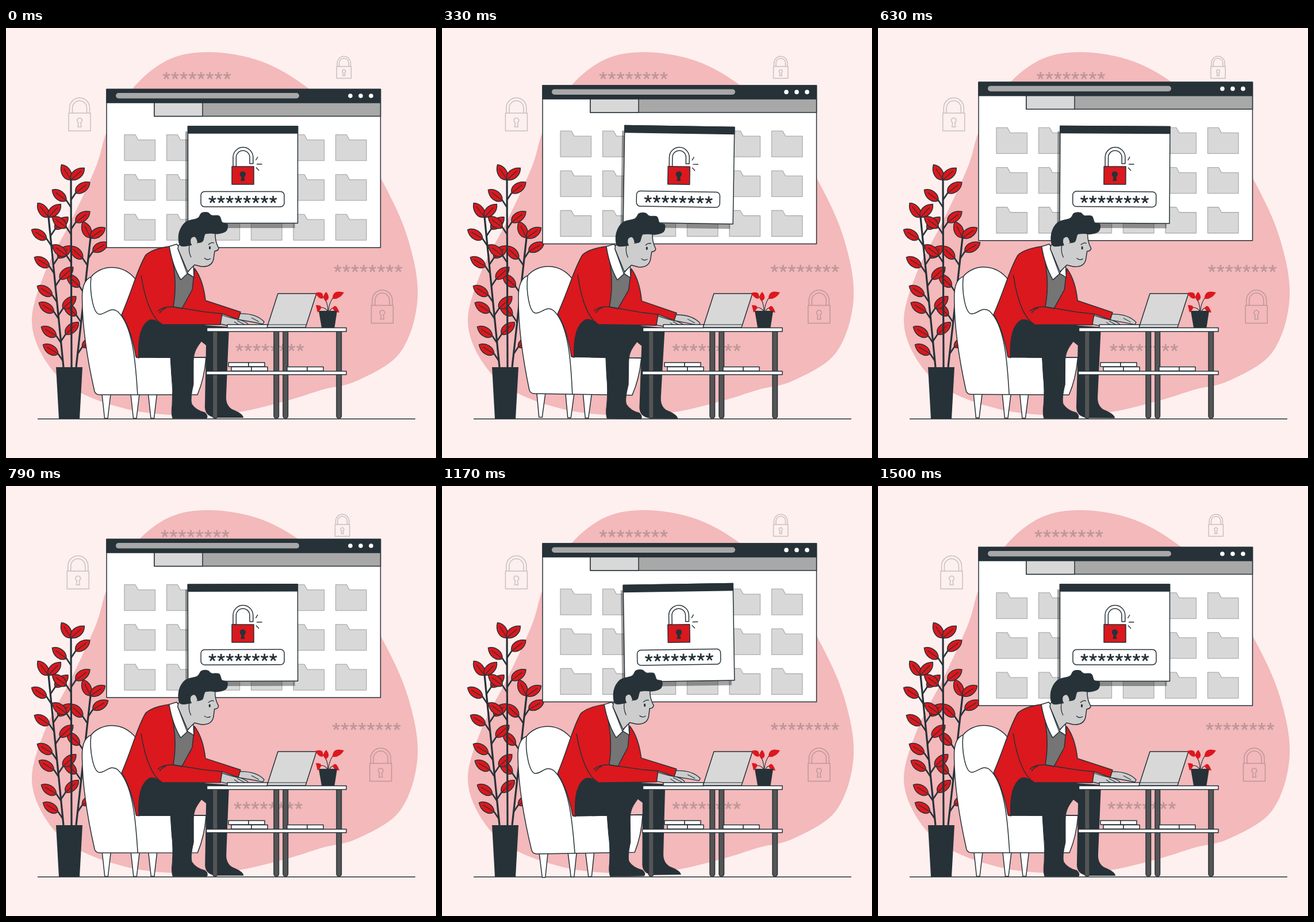
These frames come from a looping animation (748x748 px, 1540 ms). An HTML page with a canvas:

```html
<!DOCTYPE html>
<html lang="en">
<head>
<meta charset="utf-8">
<title>Password</title>
<style>
html, body { margin: 0; width: 100%; height: 100%; overflow: hidden; background: #fef0ef; }
canvas { display: block; width: 100vw; height: 100vh; }
</style>
</head>
<body>
<canvas width="748" height="748"></canvas>
<script>
const ctx = document.querySelector('canvas').getContext('2d');
const DARK = '#263238', RED = '#db181d', WHITE = '#fff', LIGHT = '#d8d8d8',
  MID = '#a8a8a8', SKIN = '#cdcdcd', FAINT = 'rgba(38,50,56,.25)';
const LOOP = 1540, FRAMES = 37, RAD = Math.PI / 180;

function draw(d, fill, stroke, width = 1.5) {
  const path = new Path2D(d);
  if (fill) { ctx.fillStyle = fill; ctx.fill(path); }
  if (stroke) { ctx.strokeStyle = stroke; ctx.lineWidth = width; ctx.stroke(path); }
}

// Smooth closed outline through "x,y x,y ..." key points.
function outline(text) {
  const pts = text.split(' ').map(p => p.split(',').map(Number));
  const pt = i => pts[(i + pts.length) % pts.length];
  const handle = (p, from, to, k) => p.map((v, a) => v + (to[a] - from[a]) * k / 6);
  return `M${pts[0]}` + pts.map((p, i) =>
    `C${handle(p, pt(i - 1), pt(i + 1), 1)} ${handle(pt(i + 1), p, pt(i + 2), -1)} ${pt(i + 1)}`).join('') + 'Z';
}

const box = (x, y, w, h, fill, stroke) => draw(`M${x} ${y}h${w}v${h}h${-w}Z`, fill, stroke);

function pill(x, y, w, h, r, fill, stroke) {
  const path = new Path2D();
  path.roundRect(x, y, w, h, r);
  draw(path, fill, stroke);
}

function at(x, y, angle, scale, paint) {
  ctx.save();
  ctx.translate(x, y);
  ctx.rotate(angle);
  ctx.scale(scale, scale);
  paint();
  ctx.restore();
}

const spin = (x, y, angle, paint) =>
  at(x, y, angle, 1, () => { ctx.translate(-x, -y); paint(); });

// Alternating jolts at every tenth, growing to 4 and dying away.
function shake(u) {
  const jolt = k => (-1) ** k * Math.floor(Math.min(4, 2 ** (Math.min(k, 10 - k) - 1)));
  const k = Math.min(9, Math.floor(u * 10)), p = u * 10 - k;
  return jolt(k) + (jolt(k + 1) - jolt(k)) * p * p * (3 - 2 * p);
}

const sway = u => Math.asin(Math.sin(2 * Math.PI * u)) * 2 / Math.PI;
const lift = u => 14.8 * (Math.abs(2 * u - 1) - 1);

function asterisks(x, y, color) {
  let d = '';
  for (let i = 0; i < 8; i++) {
    for (let k = 0; k < 5; k++) {
      const a = (k * 72 - 90) * RAD;
      d += `M${x + 7 + i * 15.1} ${y}l${6.6 * Math.cos(a)} ${6.6 * Math.sin(a)}`;
    }
  }
  draw(d, null, color, 2.7);
}

function faintLock(x, y, scale) {
  at(x, y, 0, scale, () => draw(
    'M0 27H38V58H0ZM1.5 27V18a17.5 17.5 0 0 1 35 0V27M6.5 27V18a12.5 12.5 0 0 1 25 0V27' +
    'M17 43.5a4.3 4.3 0 1 1 4 0L22 51H16Z', null, FAINT, 1.5 / scale));
}

const BLOB = outline('357,42 285,54 224,101 178,174 157,240 114,334 69,422 45,510 71,582 125,632 ' +
  '220,665 320,674 405,668 490,648 551,629 612,613 686,564 716,470 699,366 655,267 595,169 522,102 444,58');

function faintMarks() {
  asterisks(272, 83, FAINT);
  asterisks(570, 418.5, FAINT);
  asterisks(399, 556, FAINT);
  faintLock(109, 121, 1);
  faintLock(635.5, 455.5, 1);
  faintLock(575.2, 49, .665);
}

function leaf(x, y, angle) {
  at(x, y, angle * RAD, 1, () => {
    draw('M0 0C5 -11 21 -11 31 0C23 10 7 10 0 0Z', RED, DARK);
    draw('M0 0H23', null, DARK, 1.2);
  });
}

// A stem with a pair of leaves on top and side leaves at the given heights.
function stem(rootX, topX, topY, left, right) {
  const lean = Math.atan2(topX - rootX, 590 - topY) / RAD;
  const stemX = y => topX + (rootX - topX) * (y - topY) / (590 - topY);
  draw(`M${rootX} 590L${topX} ${topY}`, null, DARK, 3.2);
  for (const [heights, side] of [[left, -1], [right, 1]]) {
    for (const y of heights) {
      const x = stemX(y + 22);
      draw(`M${x} ${y + 22}L${x + side * 8} ${y + 10}`, null, DARK, 2.6);
      leaf(x + side * 8, y + 10, lean - 90 + side * 53);
    }
  }
  leaf(topX, topY, lean - 122);
  leaf(topX, topY, lean - 41);
}

function tallPlant() {
  stem(122, 147, 365, [391, 440, 490], [379, 438, 545]);
  stem(100, 74, 329, [357, 405, 455, 484, 526, 557], [340, 390, 427, 478, 523]);
  stem(114, 113, 264, [290, 337, 386], [277, 328]);
  draw('M87 590H133L128 680H92Z', DARK);
}

function browser() {
  box(175, 106.5, 476.5, 275.5, WHITE, DARK);
  box(175, 106.5, 476.5, 23.5, DARK, DARK);
  pill(191, 113, 319, 9.5, 4.7, MID);
  for (let x = 599; x < 640; x += 18) pill(x - 3.8, 114.2, 7.6, 7.6, 3.8, WHITE);
  box(258, 130, 393.5, 23.5, MID, DARK);
  box(258, 130, 84, 23.5, LIGHT, DARK);
  for (let i = 0; i < 18; i++) {
    const x = 206 + i % 6 * 73.5, y = 185.7 + Math.floor(i / 6) * 69.2;
    draw(`M${x} ${y}h19l5 9h29.5v36h-53.5Z`, LIGHT, '#afafaf', 1.3);
  }
}

function popup() {
  box(312, 180, 190.5, 168, 'rgba(0,0,0,.36)');
  box(316.5, 171, 191, 168.5, WHITE, DARK);
  box(316.5, 171, 191, 12, DARK, DARK);
  draw('M395 241V225a17.3 17.3 0 0 1 34.8 0V236H424V225a11.8 11.8 0 0 0 -23.6 0V241Z', WHITE, DARK);
  box(393, 241, 38, 31, RED, DARK);
  draw('M409.6 259a5.2 5.2 0 1 1 4.6 0L415.4 266H408.4Z', DARK);
  draw('M434.5 230L438 224M436 236.8H445.5M435 242.5L440 248', null, DARK, 1.4);
  pill(339, 284.5, 145, 26.5, 6.5, WHITE, DARK);
  asterisks(352, 298.5, DARK);
}

function armchair() {
  for (const x of [167, 217, 247.5])
    draw(`M${x} 637l4.5 42h5.5l5 -42Z`, WHITE, DARK);
  draw('M148 433C165 412 203 408 227 439L260 573H348Q345 610 333 638H163Q156 638 154 632Q133 540 132.5 470Q132 439 148 433Z', WHITE, DARK);
  draw('M148 433C145 460 152 498 163 498S181 484 194 493C224 520 226 600 229 638M226 573H348', null, DARK);
}

function legs() {
  draw('M300 514L388 520Q385 590 383 640Q382 656 393 663Q413 671 413 678H366Q344 676 346 655L348 552Z', DARK);
  draw('M228 573Q228 507 260 507L345 513C356 545 326 545 326 580V620Q320 645 323 654Q330 665 346 669Q352 675 349 679H290Q287 671 289 656Q291 630 288 605L286 573Z', DARK, DARK, 1);
}

function hands() {
  draw('M405 497Q435 496 449 511L447 515L426 511L403 507Z', SKIN, DARK, 1.3);
  draw('M374 499Q395 506 408 508Q424 514 421 518L416 520H397L373 515Z', SKIN, DARK, 1.3);
  draw('M397 511L409 519M402 509L419 518M427 504L440 511', null, DARK, 1.1);
}

function torso() {
  draw('M286 382L328 421L326 458L309 490L288 487Z', '#757575', DARK);
  draw('M328 418Q343 438 347 474L408 494L404 507L376 497L373 516H272Q260 506 250 508Q228 520 231 574L226 572Q218 525 201 499C222 450 228 420 243 395Q255 384 284 380Q300 435 291 485L306 488L324 455Z', RED, DARK);
  draw('M235 430Q246 500 272 516M264 493Q272 484 291 485L347 494L376 497M267 496Q273 488 279 487', null, DARK);
  draw('M284 380L297 376L326 413L327 434L316 427L304 438Q290 415 284 380Z', WHITE, DARK);
  draw('M299 384L315 427L326 411', null, DARK, 1.3);
}

const HAIR = outline('303,378 301,357 312,338 333,331 340,322 351,321 358,326 371,327 376,338 ' +
  '385,341 383,353 368,358 348,357 342,371 332,374 320,378');

function head() {
  draw('M300 378L320 360L364 356Q363 370 370 383Q369 388 363 388L361 402Q358 416 340 415L328 412L316 424L299 384Z', SKIN, DARK);
  draw(HAIR, DARK, DARK, 1);
  draw('M333 373Q330 358 322 366Q319 374 326 381Z', SKIN);
  draw('M319 378Q317 389 322 399M352 377Q357 372 362 374M345 400Q350 405 356 401', null, DARK, 1.3);
  pill(353, 379.5, 3, 5.5, 1.5, DARK);
}

function smallPlant() {
  draw('M560 493Q560 475 551 467M561 493Q561 480 570 467M560 493Q553 484 547 487M563 493Q565 486 574 486', null, DARK, 1.2);
  draw('M538 461Q554 456 551 471Q543 471 538 461ZM557 459Q566 470 556 475Q548 468 557 459ZM588 460Q568 454 568 471Q580 473 588 460ZM539 482Q556 482 542 495ZM568 487Q574 477 580 495Q570 494 568 487Z', RED);
  draw('M544 492H576L571.5 521H549Z', DARK);
}

function desk() {
  for (const x of [359.5, 466, 482, 575]) pill(x, 527, 8.5, 152, [0, 0, 4, 4], '#555', DARK);
  box(349.5, 521.5, 242.5, 6.5, WHITE, DARK);
  box(348.5, 597, 243.5, 6, WHITE, DARK);
  for (const [x, y] of [[387, 582], [392, 589.5], [489, 589.5]]) {
    box(x, y, 35, 7, WHITE, DARK);
    box(x + 35, y, 28, 7, WHITE, DARK);
  }
  box(385, 516, 70, 5.5, WHITE, DARK);
  draw('M473 462H540L521 521H454Z', LIGHT, DARK);
  draw('M455.5 516H522', null, DARK, 1.2);
}

function render(now) {
  const frame = Math.floor((now % LOOP) * FRAMES / LOOP + .1) % FRAMES;
  const u = frame / (FRAMES - 1);
  const tilt = sway(u) * RAD;

  ctx.lineJoin = 'round';
  box(0, 0, 748, 748, '#fef0ef');
  draw(BLOB, '#f3b9bb');
  at(shake(u) * 1.1, 0, 0, 1, faintMarks);
  draw('M55 680H712', null, DARK);
  tallPlant();
  at(0, lift(u), 0, 1, browser);
  spin(412, 255, tilt, popup);
  spin(291, 500, tilt, () => {
    armchair();
    legs();
    hands();
    torso();
    head();
  });
  desk();
  smallPlant();
  requestAnimationFrame(render);
}
render(performance.now());
</script>
</body>
</html>
```
